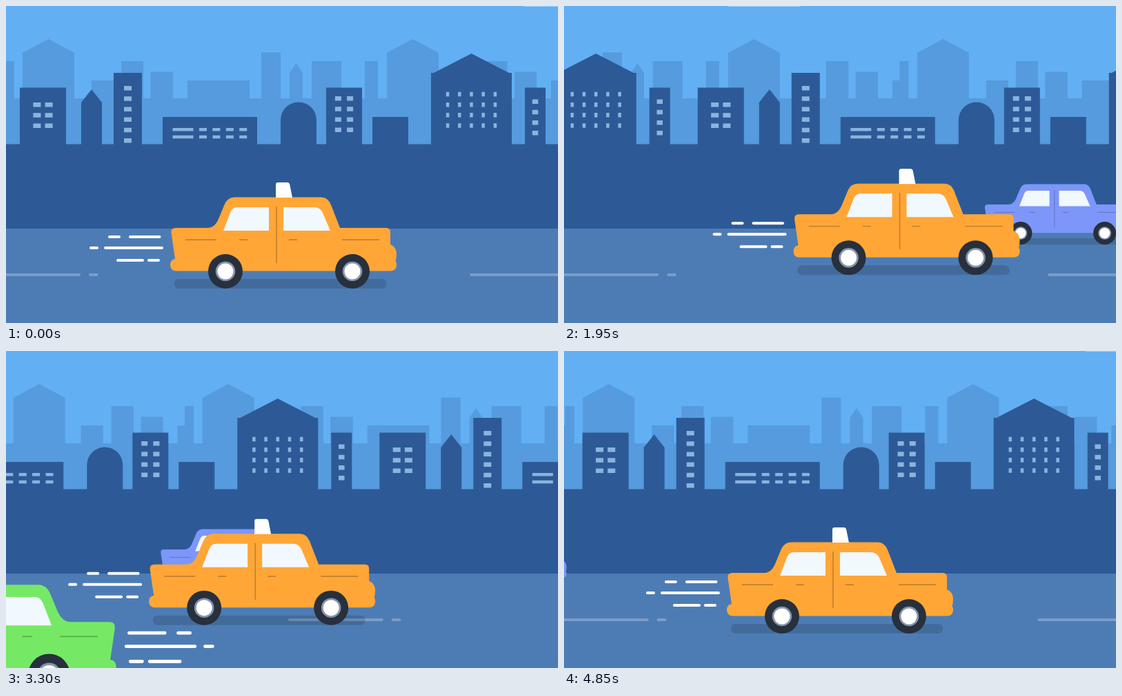
Recreate the animation shown at these times as an HTML page. Size 800x460 px, loop 4900 ms.

```html
<!DOCTYPE html>
<html lang="en">
<head>
<meta charset="utf-8">
<title>Taxi ride</title>
<style>
  html, body { margin: 0; width: 100%; height: 100%; overflow: hidden; }
  svg { display: block; }
</style>
</head>
<body>
<svg width="800" height="460" viewBox="0 0 800 460">
  <defs>
    <path id="farTile" fill="#559bde" d="M-12 136V108H-1.5V80H11.5V136H24V68L61.5 48 99 68V136H124V108H156V136H167V80H199V136H209.5V95.5H242V136H263V108H353V136H370V67.5H398V136H411V97L420.5 83 430 97V136H443V80H486V136H520V80H539V136H552V68L589.5 48 627 68V136H650V108H682V136H694V80H726.5V136H737V95.5H769V136Z"/>
    <g id="nearTile">
      <path fill="#2d5a96" d="M20 202V118.5H87V202H109V140L124 121 139 140V202H156V97H197V202H227V161H364V202H398V165.500a26 26 0 0 1 52 0V202H464V118.5H516V202H531V161H583V202H616V97H620L674.500 69 729 97H733V202H752V118.5H782V202Z"/>
      <path id="windows" fill="#8ab4df"/>
      <path d="M241.500 179.300H350M241.500 190H350" stroke="#8ab4df" stroke-width="4.500" stroke-dasharray="30 8.500 11 8.400 11 8.400 11 8.400 11"/>
    </g>
    <g id="wheel">
      <circle r="25" fill="#27303c"/>
      <circle r="14.3" fill="#8494ab"/>
      <circle r="11.5" fill="#fff"/>
    </g>
    <g id="car">
      <rect x="243.5" y="396" width="308" height="14" rx="7" fill="#000" opacity=".14"/>
      <path d="M246 322H292C300 322 305 316 308 309L316.500 288.500Q321 277.500 331 277.500H457Q466.500 277.500 471 288.500L484 322H551Q557 322 557 328V346C563 348 566 354 566 360Q566 366 564.500 370Q566.500 373 566 377Q565 384.500 557 384.500H247Q238 384.500 238 375.500Q238 368 245 367L239.500 329Q239 322 246 322Z"/>
      <path d="M315 326L325 300Q328 292 335 292H381V326ZM402 292H447Q455 292 459 300L470 326H402Z" fill="#f1f8fe"/>
      <path d="M392 291V373M260 339.300H305M338 339.300H350M410 339.300H422M487 339.300H541" fill="none" stroke="#000" stroke-opacity=".27" stroke-width="1.4"/>
      <use href="#wheel" x="318" y="385"/>
      <use href="#wheel" x="502" y="385"/>
    </g>
    <path id="speed" d="M150 335H164M180 335H222.500M123 351H132M144 351H226M162 369H198M207 369H221" fill="none" stroke="#fff" stroke-width="4" stroke-linecap="round"/>
    <path id="dash" d="M2 390H136M152 390H161.500" stroke="#7c9dc8" stroke-width="4" stroke-linecap="round"/>
  </defs>

  <rect width="800" height="460" fill="#62aff3"/>
  <rect id="cloud" width="105" height="1" fill="#fff" opacity=".4"/>
  <rect y="134" width="800" height="70" fill="#559bde"/>
  <g id="far">
    <use href="#farTile"/><use href="#farTile" x="802"/><use href="#farTile" x="1604"/>
  </g>
  <rect y="200.5" width="800" height="123" fill="#2d5a96"/>
  <g id="near">
    <use href="#nearTile"/><use href="#nearTile" x="802"/>
  </g>
  <rect y="323" width="800" height="137" fill="#4d7cb5"/>
  <g id="lane">
    <use href="#dash" x="-702"/><use href="#dash"/><use href="#dash" x="702"/>
  </g>
  <g id="purple" fill="#7d96f9"><use href="#car"/></g>
  <g id="taxi" fill="#ffa637">
    <use href="#speed"/>
    <use href="#car"/>
    <path d="M391 278V259Q391 256 394 256H407.500Q410.500 256 411.200 259L415 278Z" fill="#fff"/>
  </g>
  <g id="green" fill="#75e965"><use href="#speed"/><use href="#car"/></g>
</svg>
<script>
const LOOP = 4900, TILE = 802, LANE = 702;
const $ = id => document.getElementById(id);
const mod = (a, n) => ((a % n) + n) % n;
const move = (id, x, y = 0, rest = '') =>
  $(id).setAttribute('transform', `translate(${x} ${y}) ${rest}`);

// A grid of windows centred on a building
function panes(centre, top, cols, rows, width) {
  let d = '';
  for (let c = 0; c < cols; c++)
    for (let r = 0; r < rows; r++) {
      const x = centre + (c - (cols - 1) / 2) * 17.2 - width / 2;
      d += `M${x} ${top + r * 15.2}h${width}v6.5h${-width}z`;
    }
  return d;
}
$('windows').setAttribute('d',
  panes(53.5, 140, 2, 3, 11) + panes(176.5, 116, 1, 6, 11) + panes(490, 131, 2, 4, 9)
  + panes(674.5, 124.7, 5, 4, 4.5) + panes(767, 135.5, 1, 4, 8.5));

// Smooth swing through [time, value] keys, resting after the last one
function swing(p, ...keys) {
  const i = keys.findIndex(([at]) => at > p);
  if (i < 0) return keys.at(-1)[1];
  const [t0, v0] = keys[i - 1], [t1, v1] = keys[i];
  const u = (p - t0) / (t1 - t0);
  return v0 + (v1 - v0) * u * u * (3 - 2 * u);
}

function draw(ms) {
  // 240 poses on a 50 Hz clock, shown 20 times a second; the first is held twice as long
  const step = Math.max(0, Math.floor((ms % LOOP) / 50) - 1);
  const p = Math.max(0, Math.ceil(step * 2.5) - 1) / 240;

  move('cloud', mod(951 - 1310 * p, 1310) - 200);
  move('far', -TILE * p);
  move('near', -mod(2 * TILE * p, TILE));
  move('lane', mod(672 - 5 * LANE * p, LANE));
  move('purple', 1142 - 1361 * p, 258.5, 'scale(.6616) translate(-238 -277.5)');
  move('taxi',
    swing(p, [0, 0], [.336, 101], [.793, -57], [1.022, 0]),
    swing(p, [0, 0], [.446, -20.5], [.975, 0]));
  move('green', 2476 - 4022 * p, 339.3, 'scale(-1.215 1.215) translate(-566 -277.5)');
}

function loop() {
  draw(performance.now());
  requestAnimationFrame(loop);
}
loop();
</script>
</body>
</html>
```
